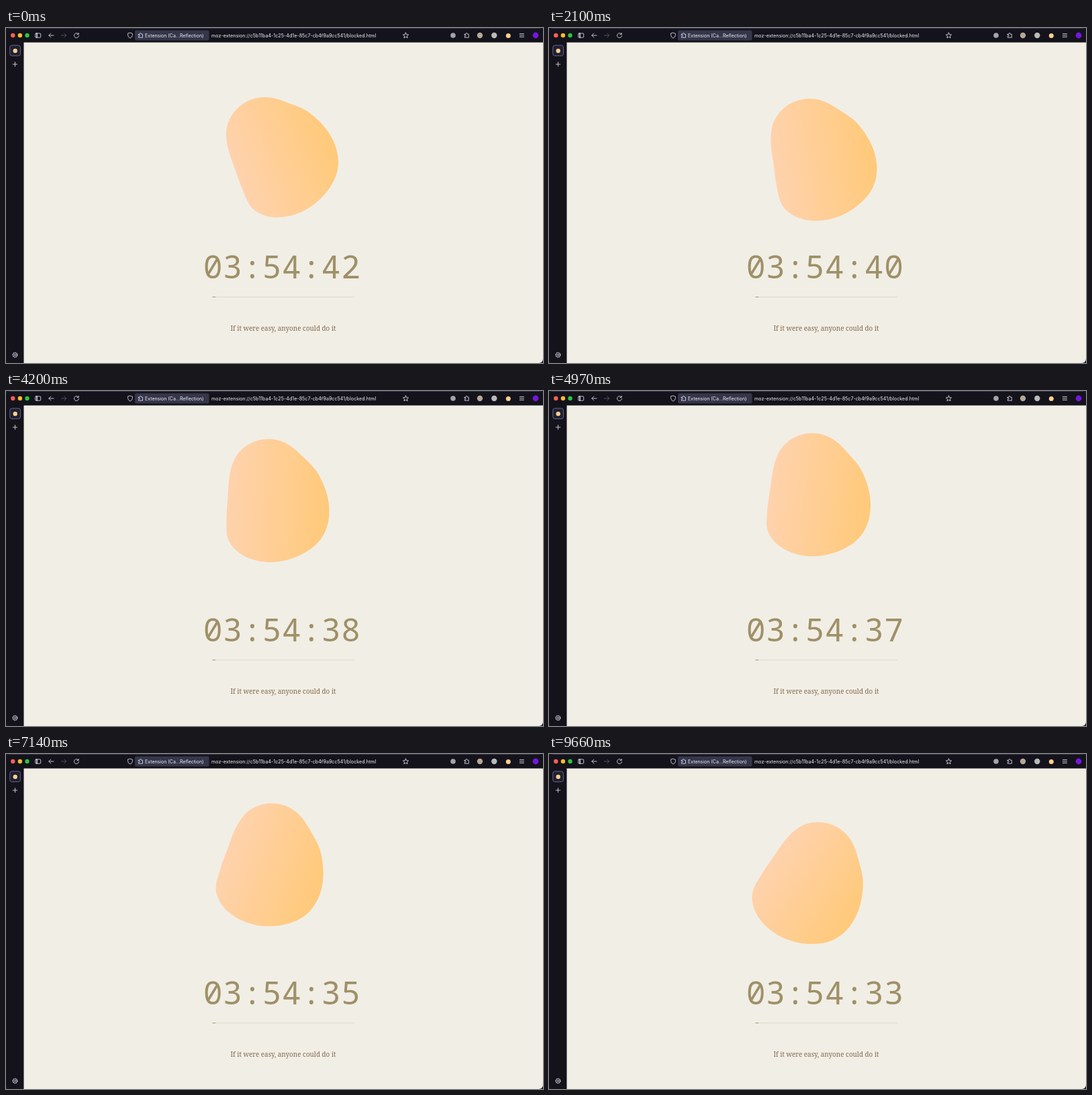
Animation of 800 by 499 pixels, one loop 9730 ms. Source, as an HTML page:

```html
<!DOCTYPE html>
<html lang="en">
<head>
<meta charset="utf-8">
<title>Focus timer</title>
<style>
  html, body { margin: 0; width: 100%; height: 100%; overflow: hidden; background: #1d1a30; }
  svg { display: block; width: 100%; height: 100%; }
  .bar { font: 7px Inter, sans-serif; fill: #f0f0f6; }
  .url { font-size: 7.17px; }
  .icon { fill: none; stroke: #d4d5e6; stroke-width: .9; stroke-linecap: round; stroke-linejoin: round; }
  .clock { font: 48px "Noto Sans Mono", monospace; letter-spacing: .55px; fill: #9f9067; }
  .quote { font: 9.9px "Noto Serif", serif; fill: #83694b; text-anchor: middle; }
</style>
</head>
<body>
<svg viewBox="0 0 800 499">
  <defs>
    <linearGradient id="peach" gradientUnits="userSpaceOnUse" x1="-76" y1="57" x2="93" y2="-5">
      <stop offset="0" stop-color="#ffd3b3"/>
      <stop offset="1" stop-color="#ffc976"/>
    </linearGradient>
    <clipPath id="window"><rect width="800" height="499" rx="6"/></clipPath>
    <path id="puzzle" d="M-3-1.6h1.8v-.6a1.1 1.1 0 0 1 2.2 0v.6h2v5h-6v-1.7h.7a1 1 0 0 0 0-2h-.7z"/>
  </defs>

  <g clip-path="url(#window)">
    <rect width="800" height="499" fill="#14131b"/>
    <path d="M0 .5h800" stroke="#3a3850"/>
    <rect x="26.5" y="21.5" width="774" height="478" fill="#f1eee6"/>

    <!-- toolbar -->
    <circle cx="10.3" cy="11" r="3.2" fill="#ff5f57"/>
    <circle cx="20.9" cy="11" r="3.2" fill="#febc2e"/>
    <circle cx="31.5" cy="11" r="3.2" fill="#28c840"/>
    <rect x="192" y="3.5" width="110.5" height="15" rx="2" fill="#35364a"/>
    <g class="icon">
      <rect x="43.7" y="8" width="8" height="6.2" rx="1"/>
      <path d="M46 8v6.2" stroke-width="1.6"/>
      <path d="M71 11h-7.2m3-3-3 3 3 3"/>
      <path d="M82.5 11h7.2m-3-3 3 3-3 3" stroke="#55566a"/>
      <path d="M107.7 8.9a3.5 3.5 0 1 0 .8 2.6m-.3-4v2h-2.2"/>
      <path d="M185 7.2l3.4 1.1v2.4q0 3-3.4 4.5-3.4-1.5-3.4-4.5V8.3z"/>
      <use href="#puzzle" x="200.5" y="10.8"/>
      <path d="M595.5 7l1.2 2.7 2.9.3-2.2 1.9.7 2.9-2.6-1.5-2.6 1.5.7-2.9-2.2-1.9 2.9-.3z"/>
      <use href="#puzzle" x="686.3" y="10.8"/>
      <path d="M765.3 8.6h6.2m-6.2 2.4h6.2m-6.2 2.4h6.2"/>
    </g>
    <text class="bar" x="207" y="13.5">Extension (Ca...Reflection)</text>
    <text class="bar url" x="306" y="13.5">moz-extension://c5b11ba4-1c25-4d1e-85c7-cb4f9a9cc541/blocked.html</text>
    <circle cx="666" cy="11" r="3.8" fill="#a3a4aa"/>
    <circle cx="706" cy="11" r="4.2" fill="#b5a995"/>
    <circle cx="727.3" cy="11" r="4.2" fill="#b9bab9"/>
    <circle cx="748.3" cy="11.5" r="3.5" fill="#ffce92"/>
    <circle cx="789" cy="11" r="4.4" fill="#7417df"/>

    <!-- sidebar -->
    <rect x="5.8" y="25.8" width="15.6" height="15.6" rx="3" fill="#20202e" stroke="#666d9c" stroke-width=".9"/>
    <circle cx="13.7" cy="34" r="3.2" fill="#ffce92"/>
    <g class="icon">
      <path d="M10.3 54h6.4m-3.2-3.2v6.4"/>
      <circle cx="13.5" cy="487" r="1.3"/>
      <circle cx="13.5" cy="487" r="3.3"/>
      <circle cx="13.5" cy="487" r="3.9" stroke-dasharray=".8 2.263" stroke-linecap="butt"/>
    </g>

    <!-- page -->
    <path id="blob" fill="url(#peach)"/>
    <text id="clock" class="clock" x="293.7" y="373"></text>
    <path d="M307.5 400.7h212" stroke="#ddd8c9"/>
    <path d="M307.5 400.7h4.5" stroke="#a5976f"/>
    <text class="quote" x="413" y="450.7">If it were easy, anyone could do it</text>
  </g>
</svg>
<script>
  const LOOP = 9730, STEP = 70;
  const SLOWDOWN = 1.05;           // playback runs slightly slower than the clock
  const FLOAT_PERIOD = 8400, LOWEST_AT = 1300;
  const DEGREES_PER_MS = 0.0056;
  const blob = document.getElementById("blob");
  const clock = document.getElementById("clock");

  // Outline around the pivot: x, y, heading in degrees.
  const outline = [
    [-19, -67.4, 0], [13.5, -60, 21], [47, -44.8, 36], [91, 29.6, 90],
    [76.5, 70, 126], [0, 111.6, 180], [-33, 101.5, 216], [-49, 76.8, 247],
    [-59.4, 49.7, 252], [-76, -12.4, 270], [-65.3, -43.6, 306]
  ];

  function smoothPath(points) {
    const along = ([x, y, heading], d) => {
      const a = heading * Math.PI / 180;
      return [x + d * Math.cos(a), y + d * Math.sin(a)];
    };
    const curves = points.map((p, i) => {
      const q = points[(i + 1) % points.length];
      const handle = 0.35 * Math.hypot(q[0] - p[0], q[1] - p[1]);
      return `C${along(p, handle)} ${along(q, -handle)} ${q[0]},${q[1]}`;
    });
    return `M${points[0][0]},${points[0][1]}${curves.join("")}Z`;
  }

  function draw(t) {
    const y = 158 + 22 * Math.cos(2 * Math.PI * (t - LOWEST_AT) / FLOAT_PERIOD);
    blob.setAttribute("transform", `translate(404 ${y}) rotate(${t * DEGREES_PER_MS})`);
    clock.textContent = `03:54:${42 - Math.floor(t / SLOWDOWN / 1000 + 0.767)}`;
  }

  function tick() {
    const t = performance.now() % LOOP;
    draw(Math.floor(t / STEP) * STEP);
    requestAnimationFrame(tick);
  }

  blob.setAttribute("d", smoothPath(outline));
  tick();
</script>
</body>
</html>
```
